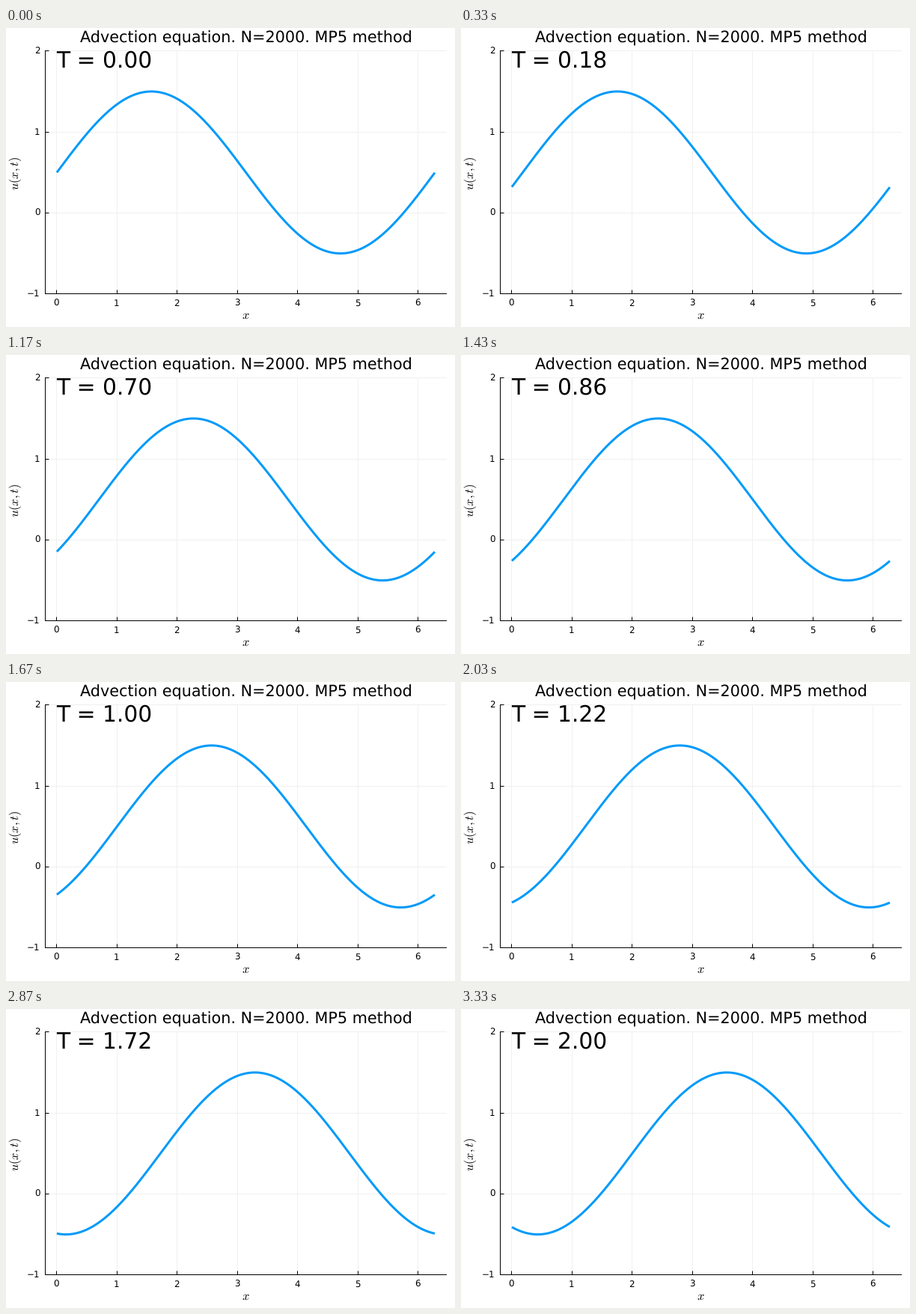
Animation of 600x400 px, one loop 3.36 s. Source, as a matplotlib script:

```python
import numpy as np
import matplotlib.pyplot as plt
from matplotlib.animation import FuncAnimation
from matplotlib.transforms import Affine2D

W, H, DPI = 600, 400, 100
LEFT, RIGHT, TOP, BOTTOM = 52.3, 587.65, 30.25, 355.25
LOOP_MS, STEPS, DT = 3360, 101, 0.02
N = 2000
PERIOD = 2 * np.pi

plt.rcParams.update({
    "font.family": "DejaVu Sans",
    "mathtext.fontset": "cm",
    "text.hinting": "none",
})


def pt(px):
    """Pixels to points."""
    return px * 72 / DPI


fig = plt.figure(figsize=(W / DPI, H / DPI), dpi=DPI, facecolor="white")


def label(x, y, text, size, ha="center", va="baseline", **kw):
    """Text placed in stage pixels, measured from the top left."""
    return fig.text(x / W, 1 - y / H, text, fontsize=pt(size),
                    ha=ha, va=va, color="black", **kw)


x = np.arange(N) * PERIOD / N
span = x[-1]

ax = fig.add_axes([LEFT / W, 1 - BOTTOM / H,
                   (RIGHT - LEFT) / W, (BOTTOM - TOP) / H])
ax.set_xlim(-0.03 * span, 1.03 * span)
ax.set_ylim(-1, 2)
ax.set_xticks(range(7))
ax.set_yticks(range(-1, 3))
ax.set_axisbelow(True)
ax.grid(color="#f0f0f0", linewidth=pt(1))
ax.tick_params(direction="in", length=pt(5), width=pt(1),
               labelbottom=False, labelleft=False)
for line in ax.get_ygridlines():
    line.set_clip_on(False)
for side in ("top", "right"):
    ax.spines[side].set_visible(False)
for side in ("left", "bottom"):
    ax.spines[side].set_linewidth(pt(1))

# Tick labels
for v in range(7):
    px = LEFT + (v / span + 0.03) / 1.06 * (RIGHT - LEFT)
    label(px, 372, str(v), 11.9)
for v in range(-1, 3):
    py = BOTTOM - (v + 1) / 3 * (BOTTOM - TOP)
    label(45.3, py + 4.2, str(v).replace("-", "\u2212"), 11.9, ha="right")

label(320.5, 19.4, "Advection equation. N=2000. MP5 method", 20.75)
label(320, 383.8, "$x$", 16.5, va="center")
label(12.8, 194, "$u(x,t)$", 16.5, va="center", rotation=90)
clock = label(67.2, 52.8, "", 29.7, ha="left")

# Straight lines snap to pixel centres; shift the smooth curve to match
half_pixel = Affine2D().translate(0.5, -0.5)
wave, = ax.plot(x, np.zeros(N), color="#009AF9", linewidth=pt(3),
                solid_capstyle="butt", zorder=3,
                transform=ax.transData + half_pixel)


def update(step):
    t = step * DT
    wave.set_ydata(0.5 + np.sin(x - t))
    clock.set_text(f"T = {t:.2f}")
    return wave, clock


anim = FuncAnimation(fig, update, frames=STEPS, interval=LOOP_MS / STEPS,
                     repeat=True, repeat_delay=0)
plt.show()
```
